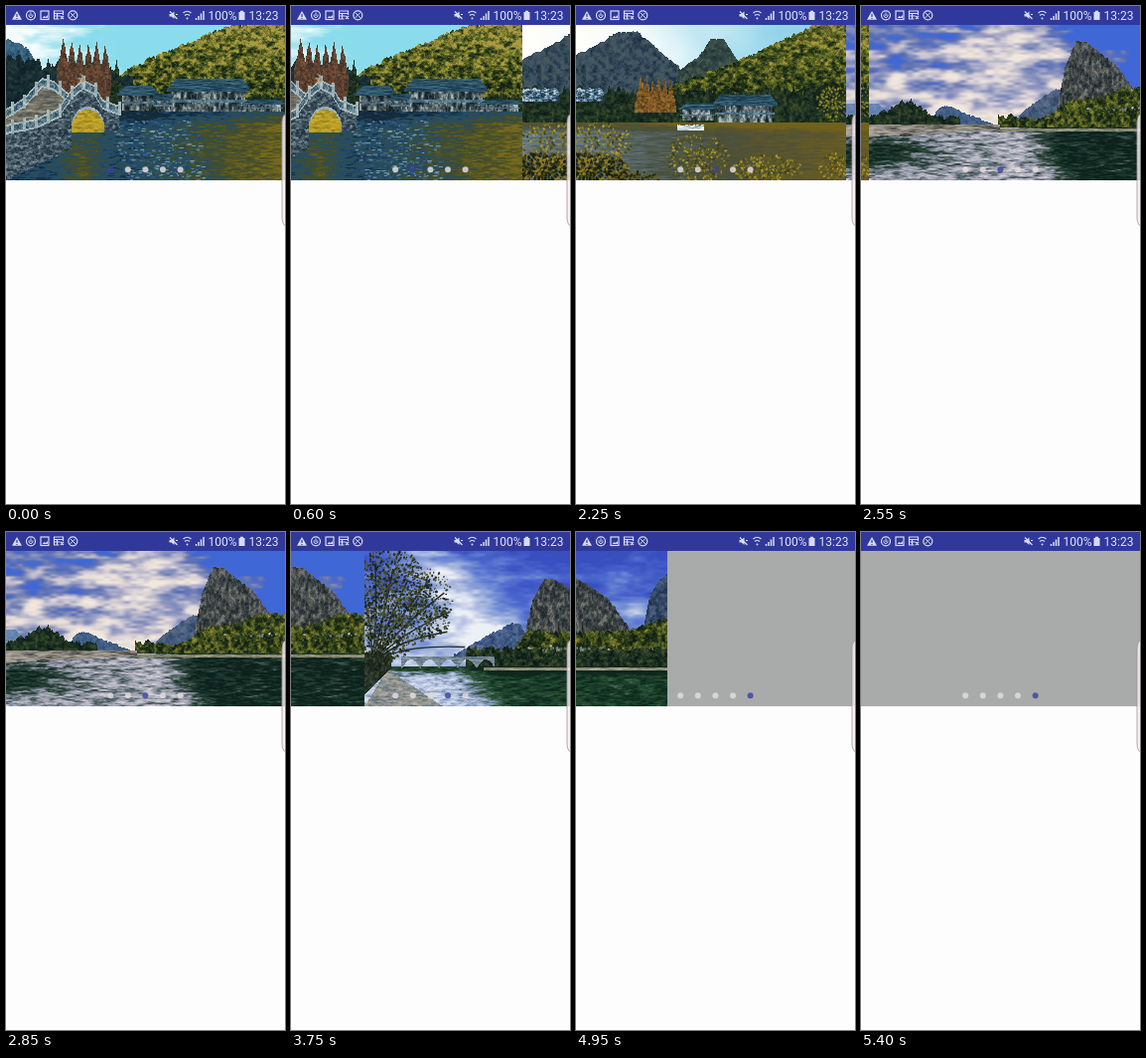
Recreate the animation shown at these times as an HTML page with a canvas. Size 281 by 500 pixels, loop 6.15 s.

```html
<!DOCTYPE html>
<html lang="en">
<head>
<meta charset="utf-8">
<title>Banner carousel</title>
<style>
  html, body { margin: 0; width: 100%; height: 100%; overflow: hidden; background: #fdfdfd; }
  #stage { position: relative; width: 281px; height: 500px; overflow: hidden; }
  #pager { position: absolute; left: 0; top: 19px; width: 281px; height: 156px; overflow: hidden; }
  #strip { display: flex; width: 1405px; }
  #strip canvas { flex: none; }
  #ui { position: absolute; left: 0; top: 0; }
  text { font: 12px Roboto, Arial, sans-serif; fill: #dfe1f2; }
</style>
</head>
<body>
<div id="stage">
  <div id="pager"><div id="strip"></div></div>
  <svg id="ui" width="281" height="500" viewBox="0 0 281 500">
    <rect width="281" height="19" fill="#30399b"/>
    <g fill="none" stroke="#d9dcf0" stroke-width="1.2">
      <path d="M11 5 16 13.7H6Z" fill="#d9dcf0" stroke="none"/>
      <path d="M11 8v3M11 12v1" stroke="#30399b"/>
      <circle cx="25" cy="9.3" r="4.5"/><path d="M25 6.5v3.5M23.3 8.500a2 2 0 1 0 3.400 0" stroke-width="1"/>
      <rect x="35" y="5" width="8" height="8.500"/><path d="M36.500 12l2-2 1.500 1 2-2v3Z" fill="#d9dcf0" stroke="none"/>
      <path d="M57.500 9V5h-9v8h5M48.500 7.500h9M48.500 10h6M51.500 7v6M55 10l3 3m0-3l-3 3"/>
      <circle cx="67.300" cy="9.300" r="4.500"/><path d="M64.500 6.500l5.500 5.500m0-5.500l-5.500 5.500" stroke-width="1"/>
      <path d="M164.500 8h2l3-2.500v7.500l-3-2.500h-2Z" fill="#d9dcf0" stroke="none"/><path d="M165 5.500l7.500 7.500M171 8.500h2"/>
      <path d="M178.500 7q4-3.500 8 0M180 9.500q2.500-2 5 0"/><circle cx="182.500" cy="12.500" r="1" fill="#d9dcf0" stroke="none"/>
      <path d="M191.500 14v-2M194 14v-4M196.500 14V7.500M199 14V5" stroke-width="1.500"/>
      <path d="M234.500 6h1.500V4.800h3V6h1.500v8h-6Z" fill="#d9dcf0" stroke="none"/>
    </g>
    <text x="203.500" y="13.700">100%</text>
    <text x="244.500" y="13.700">13:23</text>
    <g id="dots"></g>
    <path d="M282 108Q278 110 278 118V212Q278 219 282 221.500" fill="#faeef2" fill-opacity=".82" stroke="#96939b" stroke-width=".8"/>
  </svg>
</div>
<script>
const W = 281, TOP = 19, END = 175, LOOP = 6150, TICK = 150, SLIDE = 600;
const starts = [578, 2246, 3610, 4830];
let ctx, seed;

const clamp = v => Math.min(1, Math.max(0, v));
const mix = (a, b, t) => a + (b - a) * t;
const smooth = t => t * t * (3 - 2 * t);
const bump = d => Math.exp(-d * d);
const asFn = v => typeof v === 'function' ? v : () => v;

function rnd() {
  seed = (seed * 16807) % 2147483647;
  return seed / 2147483647;
}
function hash(x, y) {
  const s = Math.sin(x * 127.1 + y * 311.7) * 43758.5453;
  return s - Math.floor(s);
}
function noise(x, y) {
  const i = Math.floor(x), j = Math.floor(y), u = smooth(x - i), v = smooth(y - j);
  return mix(mix(hash(i, j), hash(i + 1, j), u), mix(hash(i, j + 1), hash(i + 1, j + 1), u), v);
}
const fbm = (x, y) => .5 * noise(x, y) + .3 * noise(x * 2, y * 2 + 9) + .2 * noise(x * 4, y * 4 + 5);

// Smooth line through x,y pairs
function curve(...k) {
  return x => {
    let i = 0;
    while (i < k.length - 4 && x > k[i + 2]) i += 2;
    return mix(k[i + 1], k[i + 3], clamp((x - k[i]) / (k[i + 2] - k[i])));
  };
}
const rough = (f, amp, size = 3) => x => asFn(f)(x) + (fbm(x / size, 3) - .5) * amp * 2;

const rgb = hex => [1, 3, 5].map(i => parseInt(hex.slice(i, i + 2), 16));
function ramp(colors, t) {
  const k = clamp(t) * (colors.length - 1), i = Math.min(colors.length - 2, Math.floor(k));
  return `rgb(${colors[i].map((c, n) => Math.round(mix(c, colors[i + 1][n], k - i)))})`;
}
// Textured area between two lines; noise and tone choose the shade
function field(x0, x1, top, base, palette, { sx = 2, sy = sx, tone = .5, gain = 1.5 } = {}) {
  const colors = palette.split(' ').map(rgb);
  const from = asFn(top), to = asFn(base), shade = asFn(tone);
  for (let x = x0; x < x1; x++) {
    const end = Math.min(END, Math.round(to(x)));
    for (let y = Math.max(TOP, Math.round(from(x))); y < end; y++) {
      ctx.fillStyle = ramp(colors, shade(x, y) + gain * (fbm(x / sx + 40, y / sy) - .5));
      ctx.fillRect(x, y, 1, 1);
    }
  }
}
function conifer(x, top, base, palette, slope = 5) {
  const half = Math.min(6, (base - top) / slope);
  field(Math.ceil(x - half), x + half, rough(v => top + Math.abs(v - x) * slope, 4, 1), base, palette);
}
// Loose leaves, thinning towards the rim of an oval
function leaves(x, y, rx, ry, n, palette, size = 1) {
  const colors = palette.split(' ');
  for (let i = 0; i < n; i++) {
    const a = rnd() * 6.283, r = rnd() ** .6, s = size * (.6 + rnd());
    ctx.fillStyle = colors[Math.floor(rnd() * colors.length)];
    ctx.beginPath();
    ctx.ellipse(x + Math.cos(a) * r * rx, y + Math.sin(a) * r * ry, s, s * .7, a, 0, 7);
    ctx.fill();
  }
}
function pavilion(x, y, w, h) {
  const roof = y + h * .38;
  field(x + 5, x + w - 5, roof, y + h, '#14232c #35474f #6b7474 #a9bac0', { sx: 3, sy: 6, gain: 2.2 });
  field(x, x + w, v => y + Math.max(0, 8 - Math.min(v - x, x + w - v)) * h / 24, roof,
    '#15303f #2b5267 #437387', { sx: 8, sy: 1 });
  field(x + 3, x + w - 3, y + h * .62, y + h * .7, '#2b5267 #7594a0', { sx: 4 });
}

const woods = '#101d12 #24351a #48551e #77772a #a99c43';
const shadeWood = '#0c1814 #16281f #263b25 #475027';
const stone = '#24343d #455a65 #718791 #a6b4b8';
const rock = '#1f272b #343c3f #525655 #7b7a73';

function bridgeLake() {
  field(0, W, TOP, 110, '#f6fcfd #bdeaf3 #8adcec', { sx: 24, sy: 8, tone: x => x / 110 });
  field(0, 42, rough(curve(0, 33, 20, 41, 40, 72), 3), 100, '#213f55 #35607c #4f7993', { sx: 3 });
  field(104, W, rough(curve(104, 74, 150, 50, 230, 18, W, 18), 4), 107, woods,
    { sx: 4, sy: 3, tone: (x, y) => .55 - (y - 60) * .008, gain: 1.9 });
  field(0, 128, rough(curve(0, 50, 45, 58, 100, 62, 128, 74), 9), 107, '#0c1c24 #162c33 #294039', { sx: 3 });
  for (let i = 0; i < 6; i++) conifer(57 + i * 8.5, 32 + 9 * hash(i, 2), 96, '#2f2c2a #5b4030 #85583a', 5);
  conifer(111, 54, 100, shadeWood);
  field(104, W, rough(92, 6), 107, shadeWood, { sx: 3 });
  pavilion(112, 80, 42, 25);
  pavilion(145, 88, 30, 18);
  pavilion(162, 73, 84, 34);
  pavilion(236, 94, 46, 13);
  field(0, W, 106, END, '#142b3b #234b68 #2b4d5a #424d2b #5c5920 #776a1b', {
    sx: 7, sy: 1.3, gain: .9,
    tone: (x, y) => .12 + .75 * clamp((x - 95) / 180) + .45 * bump((x - 76) / 25) - .4 * bump((y - 107) / 8)
  });
  for (let i = 0; i < 420; i++) {
    const depth = rnd();
    ctx.fillStyle = ['#1b426a', '#3a6e98', '#89aec0'][Math.floor(rnd() * 3)];
    ctx.fillRect(105 + depth * 15 + rnd() * 85, 115 + depth * 60, 1 + rnd() * 4, .8);
  }
  // Arched stone bridge with two railings
  const far = curve(0, 111, 18, 100, 36, 80, 48, 83, 64, 97);
  const deck = curve(0, 127, 30, 121, 52, 111, 66, 91, 77, 82, 88, 87, 97, 102, 114, 108);
  const arch = x => 127 - 23 * Math.sqrt(Math.max(0, 1 - ((x - 82) / 17) ** 2));
  field(0, 64, far, 122, '#3f4b4c #706f63 #a39a83', { sx: 7, sy: 1.5 });
  field(66, 99, arch, 127, '#8b771c #b69c22 #d0b13b', { sx: 5, sy: 2 });
  field(0, 114, deck, x => x < 66 ? 175 - x * .48 : Math.min(125, arch(x)), stone, { sx: 3, sy: 2, tone: .3 });
  field(66, 99, x => arch(x) - 3, arch, '#7a919d #b6c3c7');
  [[far, 64], [deck, 114]].forEach(([f, end]) => {
    field(0, end, x => f(x) - 7, f, '#253f4e #4f7180 #8ba0a6', { sx: 2 });
    for (const lift of [8, 0]) field(0, end, x => f(x) - lift, x => f(x) - lift + 2, '#819aa6 #c5d0d2');
    for (let x = 5; x < end; x += 12) field(x, x + 3, f(x) - 12, f(x) + 2, '#8299a1 #c1cac9');
  });
  leaves(76, 73, 3, 5, 30, '#c0ad85 #8f8a78');
}

function mountainLake() {
  field(0, W, TOP, 110, '#fffefa #f4fbfc #b9e4f1 #92d3e9', { sx: 50, tone: x => x / 230, gain: .3 });
  field(0, 120, rough(curve(0, 53, 28, 40, 48, 27, 70, 25, 88, 41, 120, 68), 2), 100,
    '#1a2c38 #2b4151 #405563 #4d5b56', { sx: 4 });
  field(111, 185, rough(curve(111, 65, 130, 53, 145, 33, 157, 33, 185, 75), 2), 100,
    '#1d302f #334846 #55604e', { sx: 3 });
  field(100, W, rough(curve(100, 82, 150, 64, 205, 40, 250, 18, W, 18), 3), 119, woods,
    { sx: 4, sy: 3, tone: (x, y) => .48 - (y - 60) * .006, gain: 1.6 });
  field(0, W, rough(curve(0, 82, 110, 86, 190, 87, W, 80), 8), 118, shadeWood, { sx: 3 });
  field(0, 37, rough(83, 3), 96, '#1e3340 #335773 #7595aa #c4d0d4', { sx: 4, sy: 2, gain: 2.2 });
  for (let x = 74; x < 106; x += 6) conifer(x, 68 + 9 * hash(x, 1), 107, '#493b1d #7d5725 #a87430');
  leaves(268, 98, 17, 18, 180, '#747023 #3b471b #998b2b');
  pavilion(111, 98, 42, 17);
  pavilion(146, 89, 66, 29);
  field(0, W, 117, END, '#728d9a #59686a #484f3c #5a552d #71611d', {
    sx: 12, sy: 1.4, gain: .5, tone: (x, y) => .15 + x / 390 + .5 * bump((y - 117) / 6)
  });
  field(111, 138, x => 119 + hash(x, 3), 125, '#315572 #a7bdc8 #f4f5ef', { sx: 6, sy: 2, tone: .8 });
  const gold = '#8f7d20 #b09a2e #625f1c #3d4018';
  leaves(30, 137, 37, 20, 330, gold);
  leaves(18, 165, 44, 17, 700, '#17210f #2b2c10 #4c4718 #8e7a20', 1.4);
  leaves(66, 173, 28, 7, 180, '#24260f #66601c');
  leaves(131, 153, 32, 25, 360, gold);
  leaves(202, 164, 35, 14, 350, gold);
  leaves(273, 161, 20, 14, 160, gold);
}

function cloudyRiver() {
  field(0, W, TOP, 125, '#3f67d5 #5d71b6 #8790bc #b5b4cb #ddd5d6 #f1e7dd', {
    sx: 27, sy: 10, gain: 1.6,
    tone: (x, y) => .43 + (y - 60) * .004 + .25 * bump((x - 165 + y * .5) / 42) - .011 * Math.max(0, x - 190)
  });
  field(0, 30, curve(0, 98, 9, 98, 30, 119), 122, '#5878a9 #7590b8');
  field(67, 130, rough(curve(67, 105, 76, 99, 90, 105, 130, 121), 2), 123, '#344f78 #536f96');
  field(142, 205, rough(curve(142, 117, 165, 98, 188, 83, 205, 88), 2), 123, '#2c405c #465d7e #617086', { sx: 3 });
  field(188, W, rough(curve(188, 107, 197, 62, 208, 36, 218, 36, 247, 58, 264, 80, W, 85), 2), 123, rock,
    { sx: 2.5, sy: 4, gain: 1.8 });
  field(176, W, rough(curve(176, 112, 200, 97, 230, 92, 255, 83, W, 82), 4), 123, woods, { sx: 4, tone: .4 });
  field(0, 92, rough(curve(0, 111, 22, 103, 38, 93, 62, 108, 92, 113), 5), 121, shadeWood, { sx: 3 });
  field(130, W, rough(curve(130, 110, 170, 113, 230, 107, W, 108), 5), 124, woods, { sx: 3, tone: .35 });
  leaves(250, 103, 30, 2, 18, '#cbc6b6 #6f7778');
  field(0, W, 122, END, '#0d211c #18352a #34483f #75808b #a8a9b7 #d2cdd5', {
    sx: 9, sy: 1.7, gain: 1.1,
    tone: (x, y) => .74 - .65 * clamp((x - 150 - (y - 130) * .6) / 40) - .62 * bump((x - 10) / 52) * bump((y - 145) / 17)
  });
  field(0, 132, 119, x => 131 - x * .05, '#413f38 #8f8b83 #bcb4aa', { sx: 12, sy: 2 });
  field(132, W, 123, 126, '#696e57 #acaa92', { sx: 6, sy: 1 });
}

function treeRiver() {
  field(0, W, TOP, 137, '#394fc1 #4b66cc #7590d5 #b0bee0 #eceff5', {
    sx: 25, sy: 9, gain: .8,
    tone: (x, y) => .12 + (y - 19) / 190 + .55 * bump((x - 85 - (y - 55) * .8) / 32) - .12 * clamp((x - 130) / 50)
      + .45 * bump((x - 248) / 18) * bump((y - 78) / 12)
  });
  field(90, 170, rough(curve(90, 123, 120, 106, 149, 91, 157, 93, 170, 121), 2), 127, '#243b65 #3e5884 #61769a', { sx: 3 });
  field(256, W, rough(curve(256, 98, 263, 63, 273, 48, W, 41), 2), 110, '#1c2b42 #354b6b #586780', { sx: 3 });
  field(160, 245, rough(curve(160, 105, 169, 68, 181, 47, 190, 47, 222, 68, 245, 100), 2), 123, rock,
    { sx: 2.5, sy: 4, gain: 1.8 });
  field(148, W, rough(curve(148, 119, 165, 98, 200, 101, 245, 98, W, 86), 3), 126, woods, { sx: 4, tone: .35 });
  field(102, W, rough(117, 5), 137, shadeWood, { sx: 3, gain: 2 });
  leaves(191, 117, 35, 3, 25, '#b4b3a7 #717978');
  field(0, W, 135, END, '#0e271d #1a4029 #315539 #7489a1 #adbcdd #d7dfec', {
    sx: 8, sy: 2, gain: .8,
    tone: (x, y) => .85 - .67 * clamp((x - 85 - Math.abs(y - 152)) / 45) - .65 * bump((y - 136) / 6)
  });
  field(120, W, 136, 139, '#696e59 #b1ad97', { sx: 8, sy: 1 });
  field(37, 131, 125, x => 137 - 9 * Math.abs(Math.sin((x - 37) / 6)), '#4d6273 #96a5b1', { sx: 6, sy: 1 });
  field(0, 78, x => x < 22 ? 175 - x * 1.7 : 137 + (x - 22) * .68, END, '#576873 #8d9291 #bbb2a2', { sx: 5, sy: 1.5 });
  field(0, 27, rough(121, 5), x => 163 - x, '#10180f #253126 #455039', { sx: 3 });
  // Branches fan out from the leaning trunk
  ctx.strokeStyle = '#202820';
  for (let i = 0; i < 9; i++) {
    const a = -1.75 + i * .21, len = 75 + 20 * hash(i, 7);
    ctx.lineWidth = 1.4;
    ctx.beginPath();
    ctx.moveTo(4, 143);
    ctx.quadraticCurveTo(14, 112, 8 + Math.cos(a) * len, 122 + Math.sin(a) * len);
    ctx.stroke();
  }
  const leaf = '#172214 #29351d #414923 #5a5b30 #232a2c';
  leaves(23, 58, 43, 42, 1100, leaf);
  leaves(38, 89, 48, 25, 620, leaf);
  leaves(66, 65, 24, 28, 190, leaf);
  leaves(16, 116, 29, 15, 300, leaf);
}

function blank() {
  ctx.fillStyle = '#a9abaa';
  ctx.fillRect(0, TOP, W, END - TOP);
}

const strip = document.getElementById('strip');
[bridgeLake, mountainLake, cloudyRiver, treeRiver, blank].forEach((paint, i) => {
  const page = document.createElement('canvas');
  page.width = W;
  page.height = END - TOP;
  ctx = page.getContext('2d');
  ctx.translate(0, -TOP);
  seed = 4217 + i * 911;
  paint();
  strip.append(page);
});

const dots = Array.from({ length: 5 }, (_, i) => {
  const dot = document.createElementNS('http://www.w3.org/2000/svg', 'circle');
  dot.setAttribute('cx', 105.2 + i * 17.6);
  dot.setAttribute('cy', 164.2);
  dot.setAttribute('r', 3);
  document.getElementById('dots').append(dot);
  return dot;
});

// Quintic ease-out, as a paging view settles
const settle = u => 1 - (1 - clamp(u)) ** 5;

const began = performance.now();
function draw() {
  const now = (performance.now() - began) % LOOP;
  const t = Math.floor(now / TICK) * TICK;
  const pos = starts.reduce((sum, s) => sum + settle((t - s) / SLIDE), 0);
  const active = starts.filter(s => t >= s).length;
  strip.style.transform = `translateX(${-Math.round(pos * W)}px)`;
  dots.forEach((dot, i) => {
    dot.setAttribute('fill', i === active ? '#3a41a0' : '#e2dadd');
    dot.setAttribute('fill-opacity', i === active ? .8 : .85);
  });
  requestAnimationFrame(draw);
}
draw();
</script>
</body>
</html>
```
